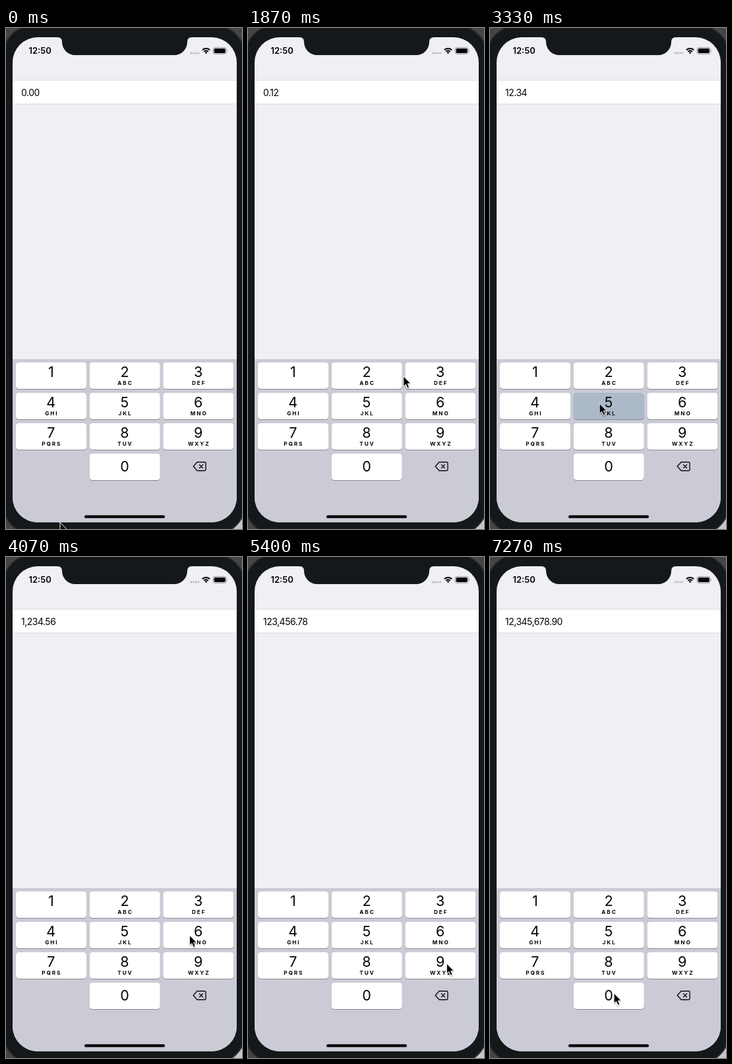
These frames come from a looping animation (358x758 px, 8 s). An HTML page:

```html
<!DOCTYPE html>
<html lang="en">
<head>
<meta charset="utf-8">
<title>Currency field</title>
<style>
  html, body { margin: 0; width: 100%; height: 100%; overflow: hidden; background: #444645; }
  svg { display: block; width: 100%; height: 100%; }
  text { font-family: Inter, Roboto, sans-serif; fill: #050505; }
  .status { font-size: 13px; font-weight: 600; }
  #amount { font-size: 14px; letter-spacing: -.5px; }
  .digit { font-size: 21.5px; text-anchor: middle; }
  .letters { font-size: 8.2px; font-weight: 700; letter-spacing: 1.9px; text-anchor: middle; }
</style>
</head>
<body>
<svg viewBox="0 0 358 758">
  <defs>
    <clipPath id="screen"><rect x="10" y="14" width="340" height="734" rx="38"/></clipPath>
    <filter id="soft" x="-50%" y="-50%" width="200%" height="200%"><feGaussianBlur stdDeviation="1.2"/></filter>
  </defs>

  <rect x="320" y="720" width="38" height="38" fill="#c4c5c5"/>
  <rect x="-5" y="-4" width="368" height="770" rx="47" fill="#15181a" stroke="#292c2d" stroke-width="2"/>

  <g clip-path="url(#screen)">
    <rect x="10" y="14" width="340" height="734" fill="#efeff4"/>
    <rect x="10" y="78.5" width="340" height="37" fill="#d9d9dd"/>
    <rect x="10" y="79.5" width="340" height="35" fill="#fff"/>
    <rect x="10" y="501" width="340" height="247" fill="#cacbd5"/>
    <path d="M78 13V14Q85 14 85 21A20 20 0 0 0 105 41H255A20 20 0 0 0 275 21Q275 14 282 14V13Z" fill="#15181a"/>
  </g>

  <text class="status" x="34.5" y="39">12:50</text>
  <path d="M279.5 38H293" stroke="#b5b5b9" stroke-width="2.6" stroke-dasharray="2.6 1.3"/>
  <g fill="none" stroke="#050505" stroke-width="2">
    <path d="M297.8 33.2A8.6 8.6 0 0 1 309.2 33.2M300.2 35.8A5 5 0 0 1 306.8 35.8"/>
    <path d="M301.9 37.2L303.5 39L305.1 37.2Q303.5 36 301.9 37.2Z" fill="#050505" stroke-width=".5"/>
  </g>
  <rect x="314.2" y="29.7" width="20" height="9.6" rx="2.8" fill="none" stroke="#8c8c90"/>
  <rect x="315.6" y="31.1" width="17.2" height="6.8" rx="1.6" fill="#050505"/>
  <path d="M335.4 33Q337.2 34.5 335.4 36Z" fill="#8c8c90"/>

  <text id="amount" x="23" y="102.5"></text>
  <g id="keys"></g>

  <g fill="none" stroke="#111" stroke-width="1.4" stroke-linejoin="round" stroke-linecap="round">
    <path d="M290 656.8H301Q303 656.8 303 658.8V667.8Q303 669.8 301 669.8H290L284.2 663.3Z"/>
    <path d="M293.5 660.8L298.5 665.8M298.5 660.8L293.5 665.8"/>
  </g>
  <rect x="119" y="737.2" width="122" height="4.4" rx="2.2" fill="#000"/>

  <g id="cursor">
    <path d="M0 2V17L3.5 14L6 20L9 19L6.500 13H11Z" fill="#000" opacity=".35" filter="url(#soft)"/>
    <path d="M0 0V15.500L3.500 12.300L6 18L8.700 16.800L6.200 11.200H11Z" fill="#000" stroke="#fff" stroke-width="1" stroke-linejoin="round"/>
  </g>
</svg>

<script>
const LOOP = 8000;
const HOLD = 130;
const FADE = 65;
const DIGITS = '1234567890';
const LETTERS = ['', 'ABC', 'DEF', 'GHI', 'JKL', 'MNO', 'PQRS', 'TUV', 'WXYZ', ''];

// Time at which each digit, in typing order, is pressed.
const presses = [800, 1470, 2200, 2930, 3330, 3870, 4600, 5000, 5470, 7070];

// Cursor moves: start time, end time, destination, optional curve control point.
const START = [82, 748];
const moves = [
  [60, 760, [73, 532], [197, 640]],
  [920, 1340, [180, 532]],
  [1600, 2130, [288, 522]],
  [2330, 2880, [73, 571]],
  [3070, 3300, [166, 568]],
  [3470, 3740, [289, 570]],
  [4000, 4530, [73, 615]],
  [4700, 4960, [168, 614]],
  [5130, 5430, [305, 615]],
  [6120, 6610, [188, 660]]
];

const $ = id => document.getElementById(id);

$('keys').innerHTML = [...DIGITS].map((digit, i) => {
  const x = 15 + 111.7 * (i === 9 ? 1 : i % 3);
  const y = 506 + 46 * Math.floor(i / 3);
  const middle = x + 53.3;
  const baseline = y + (i === 9 ? 27 : 22);
  return `<rect x="${x}" y="${y + 1}" width="107" height="40" rx="4.5" fill="#898b90"/>
    <rect class="face" x="${x}" y="${y}" width="107" height="40" rx="4.5"/>
    <text class="digit" x="${middle}" y="${baseline}">${digit}</text>
    <text class="letters" x="${middle + 1}" y="${y + 33.5}">${LETTERS[i]}</text>`;
}).join('');
const faces = document.querySelectorAll('.face');

const ease = p => p * p * (3 - 2 * p);

function cursorAt(t) {
  let from = START;
  for (const [begin, end, to, control] of moves) {
    if (t < begin) break;
    if (t < end) {
      const p = ease((t - begin) / (end - begin));
      const q = 1 - p;
      return from.map((a, k) => {
        const c = control ? control[k] : (a + to[k]) / 2;
        return q * q * a + 2 * p * q * c + p * p * to[k];
      });
    }
    from = to;
  }
  return from;
}

function faceColor(age) {
  if (age < 0 || age >= HOLD + FADE) return '#fff';
  return age < HOLD ? '#acb9c9' : '#d5dce4';
}

function draw(t) {
  const typed = presses.filter(press => t >= press + HOLD).length;
  const value = Number(DIGITS.slice(0, typed)) / 100;
  $('amount').textContent = value.toLocaleString('en-US', { minimumFractionDigits: 2 });
  faces.forEach((face, i) => face.setAttribute('fill', faceColor(t - presses[i])));
  $('cursor').setAttribute('transform', `translate(${cursorAt(t)})`);
}

const begun = performance.now();
function tick() {
  draw((performance.now() - begun) % LOOP);
  requestAnimationFrame(tick);
}
tick();
</script>
</body>
</html>
```
